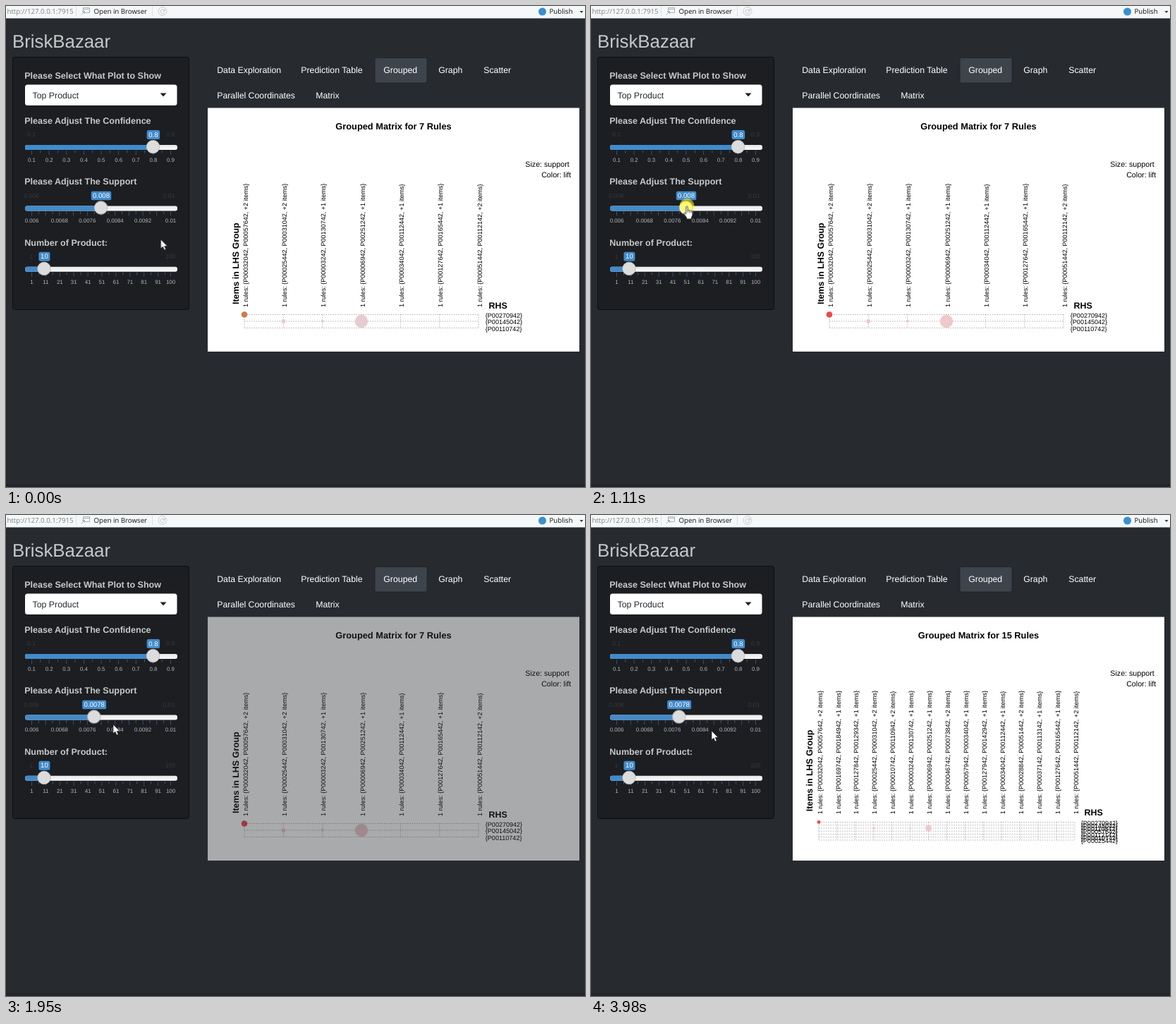
Recreate the animation shown at these times as an HTML page. Size 821 px wide and 682 px high, loop 5530 ms.

```html
<!DOCTYPE html>
<html lang="en">
<head>
<meta charset="utf-8">
<title>Association rules</title>
<style>
html, body { margin: 0; width: 100%; height: 100%; overflow: hidden; background: #272b30; }
svg { display: block; width: 100%; height: 100%; }
text { font-family: "Liberation Sans", Arial, sans-serif; text-rendering: geometricPrecision; white-space: pre; }
.bar text { font: 9.7px "Open Sans", "Noto Sans", sans-serif; }
.ui { font-size: 12.3px; fill: #fff; }
.label { font-size: 12.55px; font-weight: bold; fill: #c8c8c8; }
.tick { font-size: 7.9px; fill: #b4b6b9; text-anchor: middle; }
.edge { font-size: 8.75px; fill: #36383c; text-anchor: middle; }
.value { font-size: 9.6px; fill: #fff; text-anchor: middle; }
.head { font-size: 12.8px; font-weight: bold; text-anchor: middle; }
.axis { font-size: 12.4px; font-weight: bold; }
.item { font-size: 9.05px; }
.note { font-size: 10.7px; text-anchor: end; }
.dots { stroke: #a6a6a6; stroke-width: .9; stroke-dasharray: 1.5 1.8; fill: none; }

/* one shared loop, hard steps */
.arrow, .hand, .halo, .knob, .fill, .before, .after, .old, .new, .strong, .weak {
  animation: 5.53s step-end infinite;
}
.arrow { animation-name: arrow; }
.hand { animation-name: hand; }
.halo { animation-name: halo; }
.knob { animation-name: knob; }
.fill { animation-name: fill; }
.before { animation-name: before; }
.after { animation-name: after; }
.old { animation-name: old; }
.new { animation-name: new; }
.strong { fill: #f0454a; animation-name: strong; }
.weak { fill: #f0c8ca; animation-name: weak; }

@keyframes arrow {
  0% { transform: translate(219.5px, 331px); opacity: 1; }
  5.244% { transform: translate(217px, 330px); }
  6.329% { transform: translate(208px, 325px); }
  7.594% { transform: translate(191px, 314px); }
  8.679% { transform: translate(171px, 302px); }
  9.945% { transform: translate(155px, 292px); }
  11.03% { transform: translate(146px, 287px); opacity: 1; }
  12.296% { transform: translate(143px, 290px); opacity: 0; }
  33.634% { transform: translate(143px, 290px); opacity: 1; }
  35.262% { transform: translate(152px, 297px); }
  35.985% { transform: translate(162px, 302px); }
  36.889%, 100% { transform: translate(171px, 306px); opacity: 1; }
}
@keyframes hand {
  0% { transform: translate(138px, 283.5px); opacity: 0; }
  12.296% { opacity: 1; }
  17.902% { transform: translate(137px, 283.5px); }
  19.168% { transform: translate(136px, 283.5px); }
  20.433% { transform: translate(134.5px, 283.5px); }
  21.88% { transform: translate(133px, 283.5px); }
  23.327% { transform: translate(132px, 283.5px); }
  24.773% { transform: translate(131.5px, 283.5px); opacity: 1; }
  33.634%, 100% { transform: translate(131.5px, 283.5px); opacity: 0; }
}
@keyframes halo {
  0% { opacity: 0; }
  16.817% { opacity: 1; }
  28.028%, 100% { opacity: 0; }
}
@keyframes knob {
  0% { transform: none; fill: #dcdcdc; }
  12.296% { transform: none; fill: #fff; }
  21.88% { transform: translateX(-9.85px); fill: #fff; }
  35.262%, 100% { transform: translateX(-9.85px); fill: #dcdcdc; }
}
@keyframes fill {
  0% { width: 108px; }
  21.88%, 100% { width: 98px; }
}
@keyframes before {
  0% { opacity: 1; }
  21.88%, 100% { opacity: 0; }
}
@keyframes after {
  0% { opacity: 0; }
  21.88%, 100% { opacity: 1; }
}
@keyframes old {
  0% { opacity: 1; }
  35.262% { opacity: .6; }
  35.985% { opacity: .43; }
  36.889% { opacity: .305; }
  71.971%, 100% { opacity: 0; }
}
@keyframes new {
  0% { opacity: 0; }
  71.971%, 100% { opacity: 1; }
}
@keyframes strong {
  0% { fill: #d07a48; }
  19.168%, 100% { fill: #f0454a; }
}
@keyframes weak {
  0% { fill: #e7cccd; }
  19.168%, 100% { fill: #f0c8ca; }
}
</style>
</head>
<body>
<svg id="stage" viewBox="0 0 821 682" preserveAspectRatio="none"></svg>
<script>
const text = (cls, x, y, str, extra = '') => `<text class="${cls}" x="${x}" y="${y}" ${extra}>${str}</text>`;
const rect = (x, y, w, h, fill, extra = '') =>
  `<rect x="${x}" y="${y}" width="${w}" height="${h}" fill="${fill}" ${extra}/>`;
const circle = (x, y, r, extra) => `<circle cx="${x}" cy="${y}" r="${r}" ${extra}/>`;
const upright = (cls, x, y, str) => text(cls, 0, 0, str, `transform="translate(${x} ${y}) rotate(-90)"`);
const range = (n, fn) => Array.from({ length: n }, (_, i) => fn(i)).join('');

const START = 36.5, SPAN = 197;
const at = p => START + SPAN * p;

function topBar() {
  return `<g class="bar">${rect(0, 0, 821, 17.5, '#f4f8f9')}
    ${text('', 1.5, 10.5, 'http://127.0.0.1:7915', 'fill="#808080"')}
    <path d="M99.5 1V15M207.5 1V15" stroke="#c4c8ca" stroke-dasharray="1 1"/>
    <path d="M109.5 2.5h9v7h-9zM109.5 4.5h9M106.5 12.5l5-5m-3.500 0h3.500v3.500" fill="none" stroke="#a9b1b6"/>
    ${text('', 124.5, 10.5, 'Open in Browser', 'fill="#111"')}
    ${circle(222, 7.5, 6, 'fill="none" stroke="#c9cdcf"')}
    <path d="M224.800 6.500a3 3 0 1 0 .2 2.200M225.300 4v3h-3" fill="none" stroke="#bfc4c7"/>
    ${circle(760.5, 8, 5.5, 'fill="#3a8fcf"')}
    ${text('', 770.5, 11.3, 'Publish', 'fill="#111"')}
    <path d="M813.500 7h5l-2.500 3z" fill="#333"/></g>`;
}

function bubble(p, value, w, cls = '') {
  const x = at(p);
  return `<g class="${cls}">${rect(x - w / 2, 176, w, 13, '#428bca', 'rx="2.5"')}
    ${text('value', x, 185.7, value)}</g>`;
}

function slider(row, { label, min, max, ticks, labels, p, bubbles, live }) {
  const marks = range(Math.ceil(ticks) + 1, i => {
    const x = at(Math.min(1, i / ticks)), mid = (i + .5) / ticks;
    return rect(x - .45, 205, .9, 6, '#428bca', 'opacity=".55"') +
      (mid < 1 ? rect(at(mid) - .45, 205, .9, 3.5, '#999', 'opacity=".5"') : '');
  });
  return `<g transform="translate(0 ${86.4 * row})">
    ${text('label', 26.2, 166.8, label)}
    ${text('edge', 36, 185.3, min)}${text('edge', max.length > 3 ? 231 : 233, 185.3, max)}
    ${bubbles}
    ${rect(27, 197, 216, 7, 'url(#track)', 'rx="3"')}
    ${rect(27, 197, at(p) - 27, 7, '#428bca', `rx="3" ${live ? 'class="fill"' : ''}`)}
    ${marks}
    ${labels.map(([q, s]) => text('tick', at(q), 220.9, s)).join('')}
    ${circle(at(p) - .4, 199.6, 9.3, `fill="#dcdcdc" stroke="#b9b9b9" stroke-width=".8" ${live ? 'class="knob"' : ''}`)}
  </g>`;
}

function sidebar() {
  const tenths = [1, 2, 3, 4, 5, 6, 7, 8, 9].map((n, i) => [i / 8, `0.${n}`]);
  const supports = ['0.006', '0.0068', '0.0076', '0.0084', '0.0092', '0.01'].map((s, i) => [i / 5, s]);
  const counts = Array.from({ length: 11 }, (_, i) => [Math.min(1, i / 9.9), Math.min(100, i * 10 + 1)]);
  return `${rect(9.5, 72.5, 250, 358, '#1c1e22', 'rx="3" stroke="#0c0d0e"')}
    ${text('label', 26.2, 102.8, 'Please Select What Plot to Show')}
    ${rect(27, 111.5, 215.5, 29.5, '#fff', 'rx="3.5"')}
    ${text('ui', 37.6, 130.6, 'Top Product', 'style="fill:#272b30"')}
    <path d="M218.500 123.500h9l-4.500 5z" fill="#222"/>
    ${slider(0, { label: 'Please Adjust The Confidence', min: '0.1', max: '0.9', ticks: 8,
      labels: tenths, p: .875, bubbles: bubble(.875, '0.8', 18.5) })}
    ${slider(1, { label: 'Please Adjust The Support', min: '0.006', max: '0.01', ticks: 10,
      labels: supports, p: .5, live: true,
      bubbles: bubble(.5, '0.008', 28.5, 'before') + bubble(.45, '0.0078', 34, 'after') })}
    ${slider(2, { label: 'Number of Product:', min: '1', max: '100', ticks: 9.9,
      labels: counts, p: 9 / 99, bubbles: bubble(9 / 99, '10', 16) })}`;
}

function tabs() {
  const names = [[299.2, 95, 'Data Exploration'], [418.3, 95, 'Prediction Table'], [535.3, 95, 'Grouped'],
    [613.2, 95, 'Graph'], [677.2, 95, 'Scatter'], [299.2, 130.6, 'Parallel Coordinates'], [439.2, 130.6, 'Matrix']];
  return rect(523, 73.5, 74, 35.5, '#3e444c', 'rx="2.5" stroke="#1f2226" stroke-width=".8"') +
    names.map(([x, y, s]) => text('ui', x, y, s)).join('');
}

function plot(cls, { left, right, rows, top, bottom, textY, titleX, rhsX, lhs, rhs, spots }) {
  const n = lhs.length;
  const col = i => left + (right - left) * i / (n - 1);
  const row = i => top + (bottom - top) * i / (rhs.length - 1);
  const rules = lhs.map((s, i) => {
    const [a, b, more] = s.split(' ');
    return upright('item', col(i) + 4.6, textY, `1 rules: {P00${a}, P00${b}, +${more} items}`);
  }).join('');
  return `<g class="${cls}">${rect(286, 144.5, 527, 345.5, '#fff')}
    ${text('head', 549.5, 174.8, `Grouped Matrix for ${n} Rules`)}
    ${text('note', 798.7, 228.3, 'Size: support')}${text('note', 801.3, 243, 'Color: lift')}
    ${upright('axis', titleX, textY - 4, 'Items in LHS Group')}
    ${rules}
    ${text('axis', rhsX + 4.8, textY + 1.8, 'RHS')}
    <path class="dots" d="${range(rhs.length, i => `M${left} ${row(i)}H${right}`)}${range(n, i => `M${col(i)} ${top}V${bottom}`)}"/>
    ${spots.map(([c, r, size], i) => circle(col(c), row(r), size, `class="${i ? 'weak' : 'strong'}"`)).join('')}
    ${rhs.map((s, i) => text('item', rhsX, row(i) + 4.2, `{P00${s}}`)).join('')}
  </g>`;
}

const seven = {
  left: 338, right: 670, top: 437.5, bottom: 456.5, textY: 427, titleX: 330, rhsX: 679.8,
  lhs: ['032042 057642 2', '025442 031042 2', '003242 130742 1', '006942 251242 1',
    '034042 112442 1', '127642 165442 1', '051442 112142 2'],
  rhs: ['270942', '145042', '110742'],
  spots: [[0, 0, 4.3], [1, 1, 3], [2, 1, 2.1], [3, 1, 9.2]]
};
const fifteen = {
  left: 323, right: 686, top: 435.5, bottom: 461, textY: 424.3, titleX: 314, rhsX: 694.8,
  lhs: ['032042 057642 2', '169742 184942 1', '127842 129342 1', '025442 031042 2', '010742 110942 2',
    '003242 130742 1', '006942 251242 1', '046742 073842 2', '057942 034042 1', '127942 142942 1',
    '034042 112442 1', '028842 051442 2', '037142 113142 1', '127642 165442 1', '051442 112142 2'],
  rhs: ['270942', '145042', '110842', '057642', '112142', '010742', '025442'],
  spots: [[0, 0, 2.4], [3, 2, 2], [5, 2, 1.3], [6, 2, 4.5]]
};

const pointers = `<g class="hand">
    ${circle(0, 0, 10.5, 'class="halo" fill="rgba(255,244,20,.58)"')}
    <path d="M-1.200 1.200q1.200-1.400 2.400 0v5q1.300-.8 2.300.3q1.300-.6 2.200.5q1.800-.4 2.200 1.300v5l-1.600 3.200v2h-6.600v-1.800l-3.800-5.200q-.6-2 1.200-1.600l1.700 1.600z"
      fill="#fff" stroke="#222" stroke-width=".8"/>
    <path d="M1.200 6v3.500M3.500 6.800v3M5.700 7.500v2.500" stroke="#222" stroke-width=".7"/>
  </g>
  <path class="arrow" d="M0 0V12.800L2.900 10.200L5 15L7.200 14L5.100 9.400H9.200Z" fill="#fff" stroke="#111" stroke-width=".6"/>`;

document.getElementById('stage').innerHTML = `
  <defs><linearGradient id="track" x2="0" y2="1">
    <stop stop-color="#e9e9e9"/><stop offset="1" stop-color="#f8f8f8"/>
  </linearGradient></defs>
  ${rect(0, 0, 821, 682, '#272b30')}${rect(0, 678.5, 821, 3.5, '#212429')}
  ${topBar()}
  ${text('', 9, 58.6, 'BriskBazaar', 'font-size="25.8" fill="#c8c8c8"')}
  ${sidebar()}${tabs()}
  ${plot('old', seven)}${plot('new', fifteen)}
  ${pointers}`;
</script>
</body>
</html>
```
